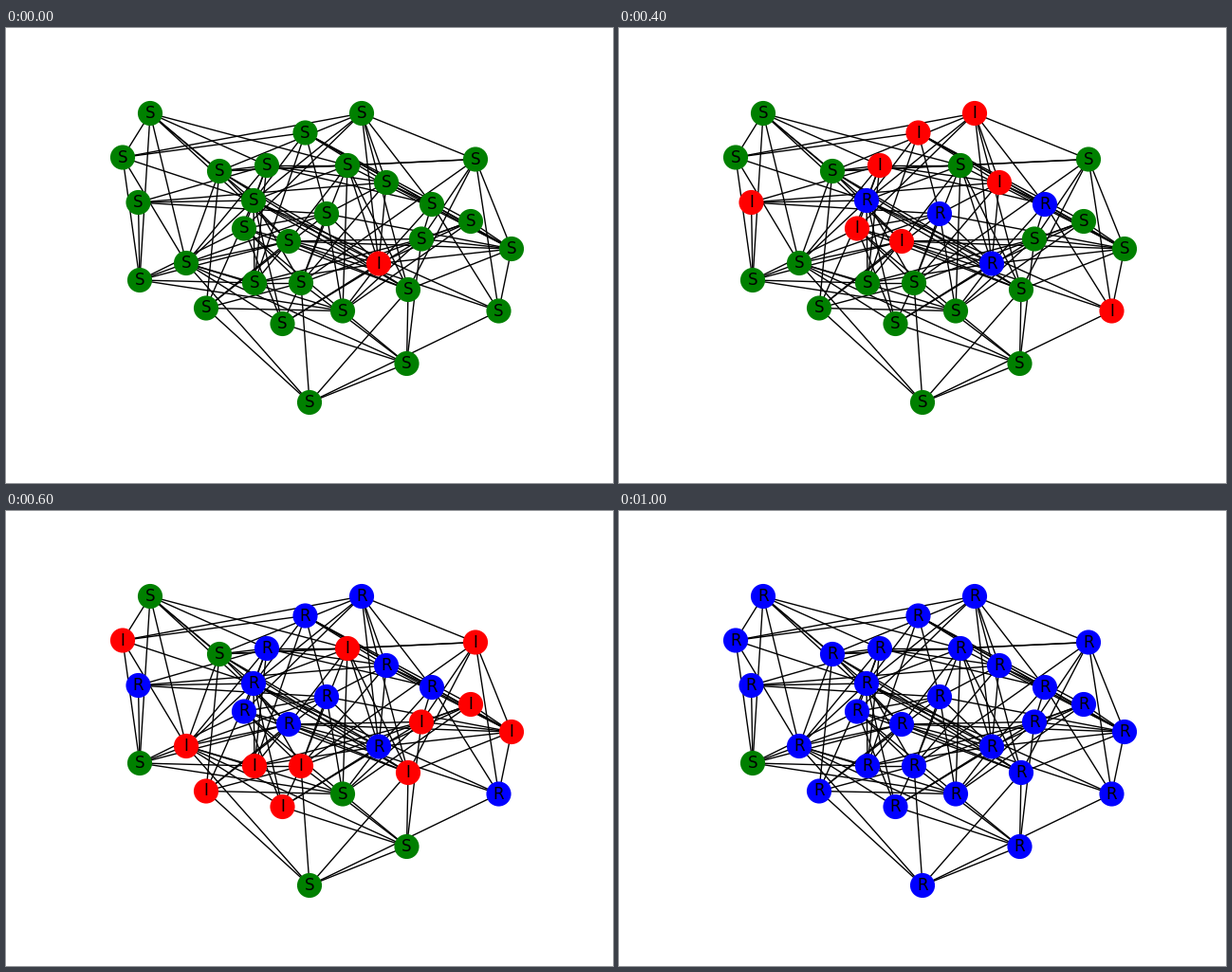
Write a matplotlib script that moves like this. It is 640x480 px and loops after 1200 ms.

```python
import matplotlib.pyplot as plt
from matplotlib.animation import FuncAnimation
from matplotlib.collections import LineCollection

W, H, DPI = 640, 480, 100
STEPS, STEP_MS = 6, 200

NODES = [
    (152, 90), (123, 136.5), (139.5, 184), (141, 266), (190, 248),
    (211, 295.5), (225, 151), (275, 145), (261, 182), (251, 211.5),
    (298, 225), (262, 269), (311, 269), (291.5, 312), (315.5, 110.5),
    (375, 90), (360, 145), (401, 163), (338, 196), (449, 186),
    (438, 222.5), (393, 248.5), (424, 276), (355, 298.5), (490, 204),
    (495, 138.5), (533, 233), (519.5, 298.5), (422.5, 354), (320, 395),
]

# Row i holds the higher-numbered contacts of person i.
CONTACTS = [
    (1, 3, 4, 6, 7, 8, 10, 16),
    (3, 4, 8, 14, 15),
    (3, 7, 8, 17, 18),
    (4, 9, 10, 11, 23),
    (6, 7, 8, 10, 11, 13, 18, 23, 28, 29),
    (6, 8, 10, 12, 18, 23, 29),
    (7, 10, 15, 16, 21, 22, 25),
    (8, 9, 11, 16, 17, 19),
    (11, 12, 13, 14, 15, 16, 21, 22, 27),
    (12, 13, 15, 18, 21, 22, 23),
    (11, 16, 20, 22, 26, 27),
    (12, 14, 20, 21),
    (13, 16, 17, 18, 24, 25, 28, 29),
    (20, 21, 28),
    (17, 18, 19, 24, 26),
    (17, 19, 21, 22, 25),
    (21, 22, 23, 25, 26),
    (18, 19, 21, 26),
    (21, 23, 26),
    (20, 21, 26, 27),
    (23, 24, 25, 26, 28),
    (23, 24, 26),
    (25, 26, 28, 29),
    (24, 28),
    (26,),
    (26, 27),
    (27,),
    (29,),
    (29,),
]

# People who fall ill at each step; each recovers one step later.
WAVES = [
    (21,),
    (8, 18, 19),
    (2, 7, 9, 10, 14, 15, 17, 27),
    (1, 4, 5, 11, 12, 13, 16, 20, 22, 24, 25, 26),
    (0, 6, 23, 28, 29),
]
ONSET = {person: step for step, wave in enumerate(WAVES) for person in wave}
COLORS = {"S": "green", "I": "red", "R": "blue"}


def state(person, step):
    onset = ONSET.get(person, STEPS)
    if step < onset:
        return "S"
    return "I" if step == onset else "R"


fig = plt.figure(figsize=(W / DPI, H / DPI), dpi=DPI, facecolor="white")
ax = fig.add_axes([0, 0, 1, 1])
ax.set(xlim=(0, W), ylim=(H, 0))
ax.axis("off")

edges = [(NODES[a], NODES[b]) for a, row in enumerate(CONTACTS) for b in row]
ax.add_collection(LineCollection(edges, colors="black", linewidths=1, zorder=1))
dots = ax.scatter(*zip(*NODES), s=300, linewidths=1.5, zorder=2)
labels = [
    ax.text(x, y, "", fontsize=12, family="DejaVu Sans", color="black",
            ha="center", va="center", zorder=3)
    for x, y in NODES
]


def draw(step):
    states = [state(person, step) for person in range(len(NODES))]
    dots.set_color([COLORS[s] for s in states])
    for label, s in zip(labels, states):
        label.set_text(s)
    return [dots, *labels]


anim = FuncAnimation(fig, draw, frames=STEPS, interval=STEP_MS,
                     repeat=True, repeat_delay=0)
plt.show()
```
